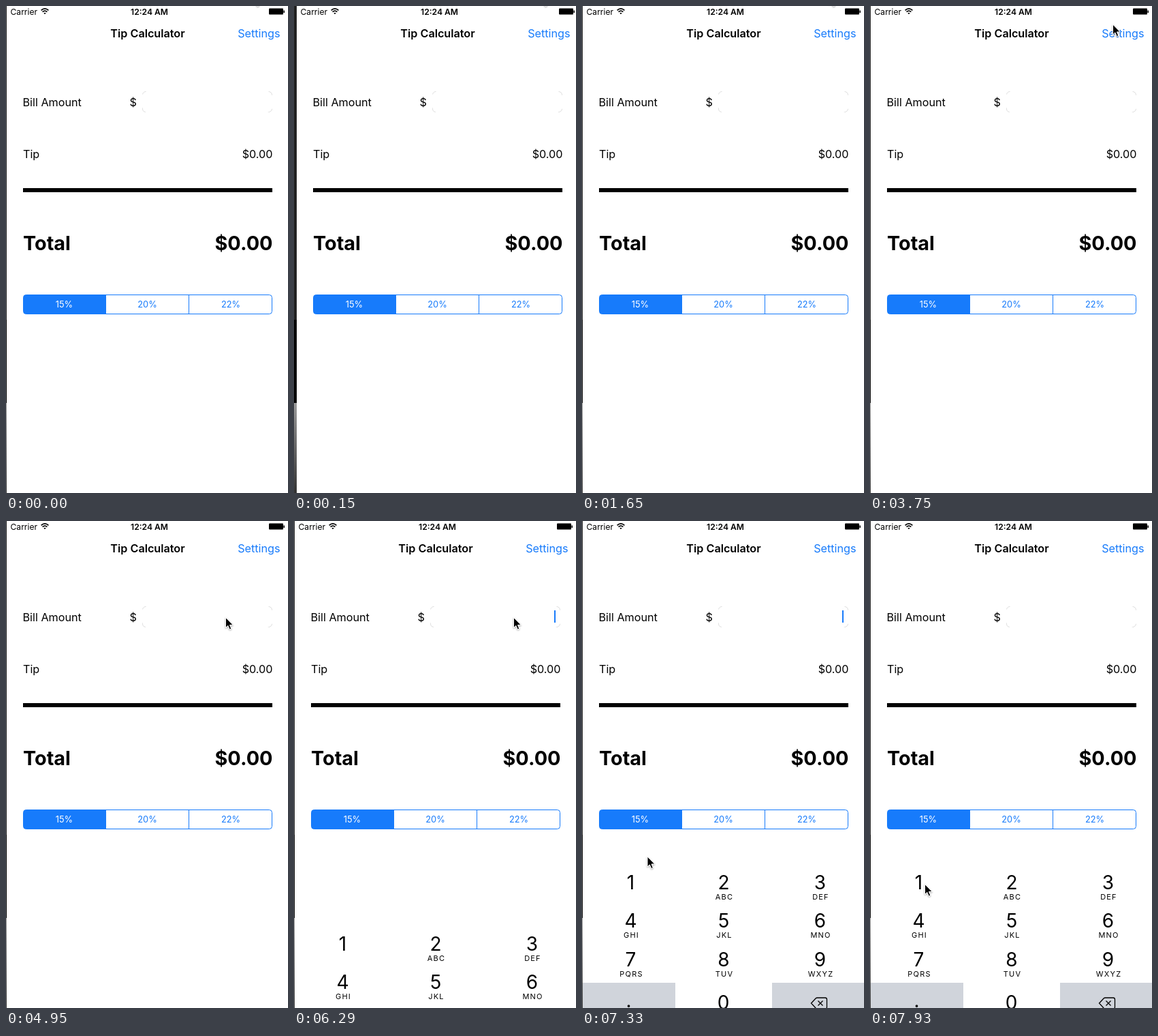
Write an HTML page that moves like this. It is 414 by 714 pixels and loops after 8000 ms.

```html
<!DOCTYPE html>
<html lang="en">
<head>
<meta charset="utf-8">
<title>Tip Calculator</title>
<style>
  html, body { margin: 0; width: 100%; height: 100%; overflow: hidden; background: #fff; }
  svg { display: block; width: 414px; height: 714px; font: 16.2px Inter, Roboto, sans-serif; }
  .status { font-size: 12.1px; }
  .semi { font-weight: 600; }
  .total { font-size: 28.8px; font-weight: 700; }
  .seg { font-size: 12.8px; }
  .digit { font-size: 28px; }
  .letters { font-size: 11px; letter-spacing: 1.2px; }
  .mid { text-anchor: middle; }
  .end { text-anchor: end; }
  .blue { fill: #177bfb; }
</style>
</head>
<body>
<svg viewBox="0 0 414 714">
  <defs>
    <linearGradient id="shade" x1="0" y1="0" x2="0" y2="1">
      <stop offset="0" stop-color="#999"/>
      <stop offset="1" stop-color="#333"/>
    </linearGradient>
    <filter id="soft" x="-50%" y="-50%" width="200%" height="200%">
      <feDropShadow dx="0" dy="1" stdDeviation="1" flood-opacity=".4"/>
    </filter>
  </defs>

  <!-- dark strip uncovered when the window slides -->
  <rect width="5" height="460" fill="#222"/>
  <rect y="460" width="5" height="122"/>
  <rect y="582" width="5" height="132" fill="url(#shade)"/>

  <g id="page">
    <rect x="1" width="420" height="714" fill="#fff"/>
    <text class="status" x="6.5" y="13">Carrier</text>
    <g fill="none" stroke="#000" stroke-width="1.7">
      <path d="M51.6 6.3Q57 1.3 62.4 6.3M53.6 8.6Q57 5.5 60.4 8.6"/>
      <path d="M57 12.2L55.4 10.3Q57 9 58.6 10.3Z" fill="#000" stroke="none"/>
    </g>
    <text class="status semi mid" x="210.5" y="13">12:24 AM</text>
    <rect x="386" y="3.5" width="21" height="9" rx="1"/>
    <rect x="407.5" y="6.5" width="1.5" height="3.5"/>

    <text class="semi mid" x="208" y="46">Tip Calculator</text>
    <text class="blue end" x="402.5" y="46">Settings</text>

    <text x="24.5" y="147">Bill Amount</text>
    <text x="181.5" y="147">$</text>
    <rect x="200.5" y="125.5" width="190" height="30" rx="5" fill="none" stroke="#ddd"
          stroke-dasharray="0 180 8 20 8 180 8 20 8 0"/>
    <text x="25" y="223">Tip</text>
    <text class="end" x="391.5" y="223">$0.00</text>
    <rect x="25" y="267" width="366" height="6"/>
    <text class="total" x="25" y="357.5">Total</text>
    <text class="total end" x="391.5" y="357.5">$0.00</text>

    <path class="blue" d="M147 423.5H29.5Q25.5 423.5 25.5 427.5V447.5Q25.5 451.5 29.5 451.5H147Z"/>
    <rect x="25.5" y="423.5" width="365" height="28" rx="4" fill="none" stroke="#177bfb"/>
    <path d="M146.5 424V451M268.5 424V451" stroke="#177bfb"/>
    <text class="seg mid" x="85.5" y="442" fill="#fff">15%</text>
    <text class="seg mid blue" x="207.5" y="442">20%</text>
    <text class="seg mid blue" x="330" y="442">22%</text>
  </g>

  <rect id="caret" class="blue" x="382" y="131" width="2" height="18"/>

  <g id="pad">
    <rect x="1" y="502" width="413" height="230" fill="#fff"/>
    <path d="M1 677H137V732H1ZM279 677H414V732H279Z" fill="#d0d4db"/>
    <text class="digit mid" x="68.5" y="712.5">.</text>
    <g fill="none" stroke="#000" stroke-width="1.3">
      <path d="M336.5 707L343 700Q344 699 345.5 699H357Q359.5 699 359.5 701.5V712.5Q359.5 715 357 715H345.5Q344 715 343 714Z"/>
      <path d="M346.5 703.5L353.5 710.5M353.5 703.5L346.5 710.5"/>
    </g>
  </g>

  <path id="cursor" d="M0 0V15L3.4 11.9L5.8 17.6L8.3 16.5L6 11H10.8Z"
        stroke="#fff" stroke-width="1" filter="url(#soft)"/>
</svg>
<script>
const LOOP = 8000;
const $ = id => document.getElementById(id);

function addText(cls, x, y, label) {
  const el = document.createElementNS("http://www.w3.org/2000/svg", "text");
  el.setAttribute("class", cls + " mid");
  el.setAttribute("x", x);
  el.setAttribute("y", y);
  el.textContent = label;
  $("pad").append(el);
}

const letters = ["", "ABC", "DEF", "GHI", "JKL", "MNO", "PQRS", "TUV", "WXYZ"];
letters.forEach((word, i) => {
  const x = [71.5, 208, 349.5][i % 3];
  const y = 539.5 + Math.floor(i / 3) * 56.5;
  addText("digit", x, y, i + 1);
  addText("letters", x + 1, y + 15, word);
});
addText("digit", 207.5, 715.5, 0);

// Each track holds its values from the given time until the next entry.
const slide = [[0, 0], [150, 3], [900, 2], [1500, 1], [1650, 0]];
const padDrop = [[0, 240], [6140, 180], [6290, 90], [6590, 0]];
const caretOn = [[0, 0], [6140, 1], [6740, 0], [7180, 1], [7630, .5], [7780, 0]];
const pointer = [
  [0, 363, -17], [3750, 356.5, 27], [3900, 345, 77], [4050, 330, 138],
  [4200, 328, 152], [4650, 324, 144], [4800, 322.5, 141.5],
  [7180, 295, 160], [7330, 96, 492], [7480, 56, 563],
  [7780, 70, 545], [7930, 80.5, 532.5]
];
const at = (track, t) => track.findLast(key => key[0] <= t).slice(1);
const move = (id, x, y) => $(id).setAttribute("transform", `translate(${x} ${y})`);

function draw(now) {
  const t = now % LOOP;
  move("page", at(slide, t)[0], 0);
  move("pad", 0, at(padDrop, t)[0]);
  move("cursor", ...at(pointer, t));
  $("caret").setAttribute("opacity", at(caretOn, t)[0]);
}

let start;
function tick(now) {
  start ??= now;
  draw(now - start);
  requestAnimationFrame(tick);
}
draw(0);
requestAnimationFrame(tick);
</script>
</body>
</html>
```
